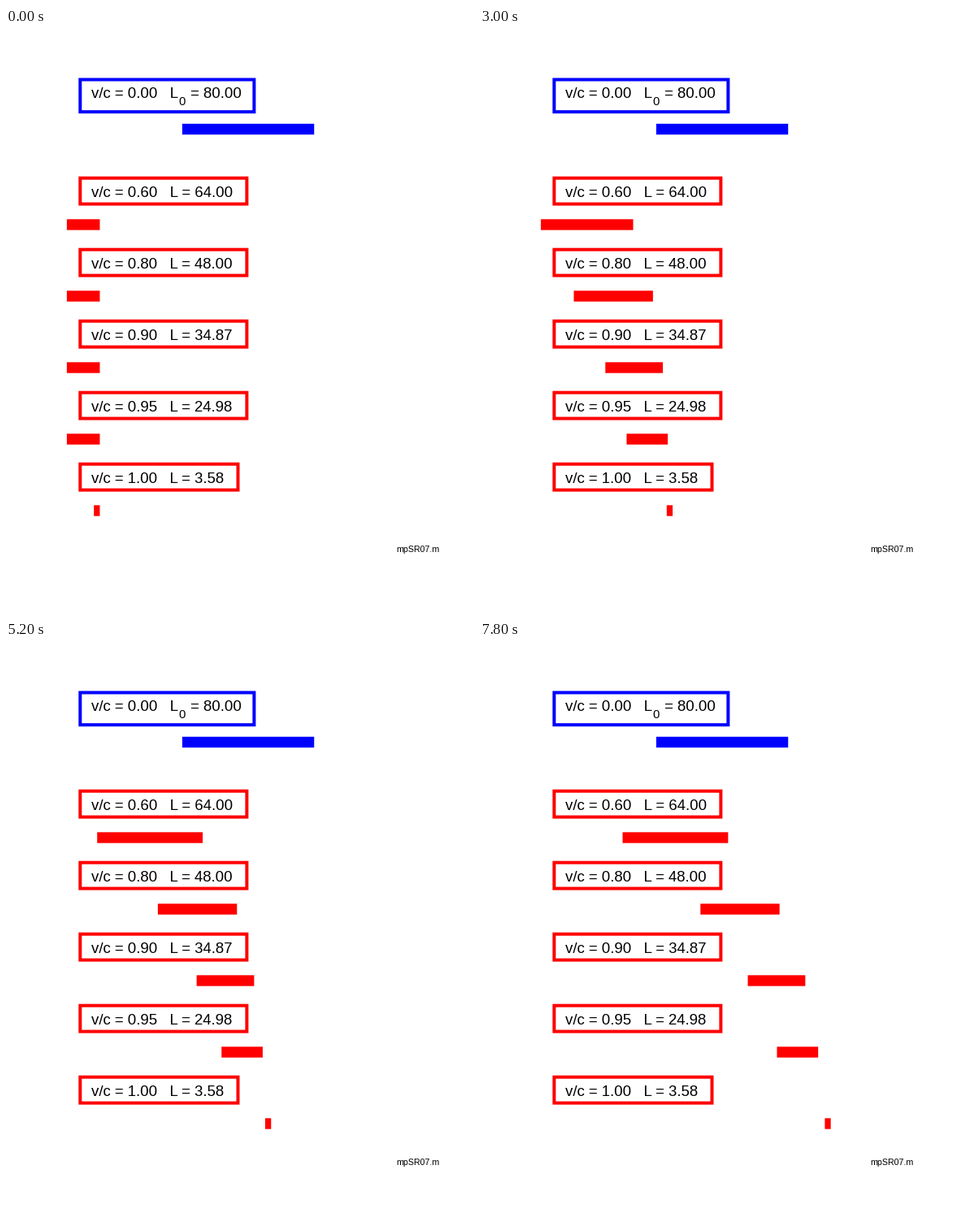
These frames come from a looping animation (576 px wide and 720 px high, 8000 ms). A matplotlib script:

```python
import math

import matplotlib.pyplot as plt
from matplotlib.animation import FuncAnimation
from matplotlib.patches import Rectangle

W, H, DPI = 576, 720, 96
FRAMES, INTERVAL = 40, 200

X0 = 0.13 * W               # pixel position of x = 0
UNIT = 0.775 * W / 220      # pixels per length unit
REST_LENGTH = 80
START = 20                  # nose of every rod at t = 0
C_STEP = 4                  # distance light covers per frame
BAR_H = 40 / 3
SPEEDS = [0.6, 0.8, 0.9, 0.95, 0.999]
ROW_GAP = 88

plt.rcParams["font.family"] = "Liberation Sans"

fig = plt.figure(figsize=(W / DPI, H / DPI), dpi=DPI, facecolor="white")
ax = fig.add_axes([0, 0, 1, 1])
ax.set_xlim(0, W)
ax.set_ylim(H, 0)
ax.axis("off")


def to_px(x):
    return X0 + max(x, 0) * UNIT


def label(x, y, text, size=14):
    ax.text(x, y, text, fontsize=size, color="black", ha="left", va="baseline")


def frame_box(right, top, bottom, color):
    left = 91.3
    ax.add_patch(Rectangle((left, top), right - left, bottom - top, fill=False,
                           edgecolor=color, linewidth=3, joinstyle="miter",
                           snap=False))


def add_bar(y, color):
    bar = Rectangle((X0, y - BAR_H / 2), 0, BAR_H, facecolor=color,
                    edgecolor="none", linewidth=0, snap=False)
    return ax.add_patch(bar)


def place(bar, tail, nose):
    bar.set_x(to_px(tail))
    bar.set_width(to_px(nose) - to_px(tail))


def contracted(beta):
    return REST_LENGTH * math.sqrt(1 - beta ** 2)


# Rod at rest
frame_box(305.4, 63.5, 103.2, "blue")
label(105, 86, "v/c = 0.00   L")
label(212.4, 95, "0", 11.2)
label(222, 86, f" = {REST_LENGTH:.2f}")
place(add_bar(124.5, "blue"), 70, 70 + REST_LENGTH)

# Moving rods
bars = []
for i, beta in enumerate(SPEEDS):
    dy = i * ROW_GAP
    length = f"{contracted(beta):.2f}"
    right = 296.4 if len(length) == 5 else 285.5
    frame_box(right, 184.7 + dy, 216.6 + dy, "red")
    label(105, 208 + dy, f"v/c = {beta:.2f}   L = {length}")
    bars.append(add_bar(242 + dy, "red"))

label(480, 645, "mpSR07.m", 8)


def update(frame):
    for bar, beta in zip(bars, SPEEDS):
        nose = START + beta * C_STEP * frame
        place(bar, nose - contracted(beta), nose)
    return bars


anim = FuncAnimation(fig, update, frames=FRAMES, interval=INTERVAL,
                     init_func=lambda: update(0), repeat=True, repeat_delay=0)
plt.show()
```
